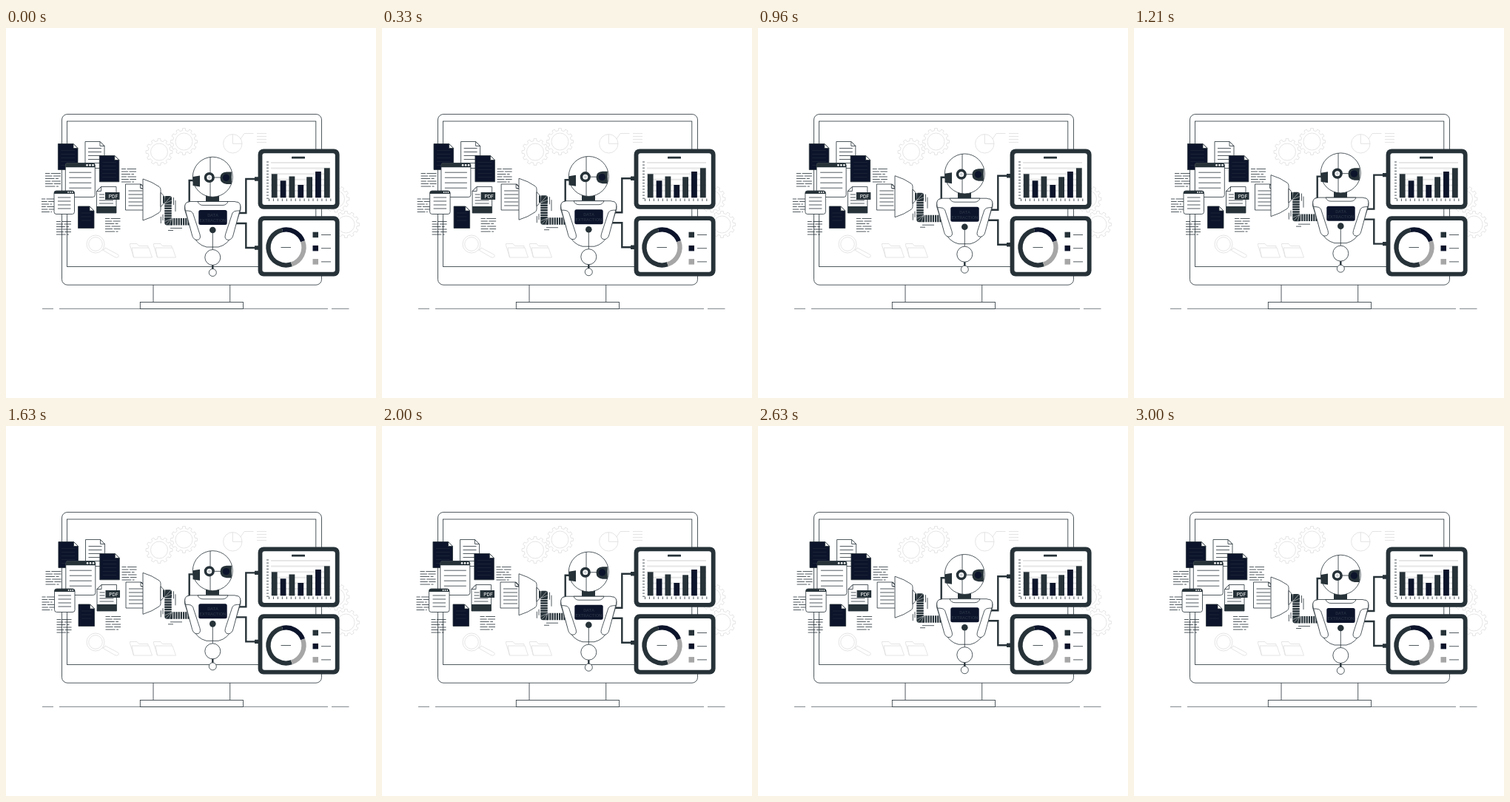
These frames come from a looping animation (500x500 px, 3040 ms). An HTML page:

```html
<!DOCTYPE html>
<html lang="en">
<head>
<meta charset="utf-8">
<title>Data extraction</title>
<style>
html, body { margin: 0; width: 100%; height: 100%; overflow: hidden; background: #fff; }
svg { display: block; width: 100vw; height: 100vh; }
text { font-family: Roboto, Arial, sans-serif; text-anchor: middle; }
.line { fill: none; stroke: #263238; stroke-width: .8; }
.paper { fill: #fff; stroke: #263238; stroke-width: .8; }
.faint { fill: none; stroke: #dedede; stroke-width: .8; }
.dark { fill: #263238; }
.navy { fill: #0c142b; }
.gray { fill: #a6a6a6; }
.pipe { fill: none; stroke: #263238; stroke-width: 2.4; }
</style>
</head>
<body>
<svg viewBox="0 0 500 500">
  <g id="backdrop">
    <path class="line" style="stroke-width:.6" d="M49 379.4H64M72 379.4H435M440 379.4H463.5"/>
    <g id="gears" class="faint"></g>
    <rect class="line" x="75.5" y="116.5" width="351" height="230.7" rx="7.5"/>
    <rect class="line" x="82.5" y="126" width="336.3" height="196.5"/>
    <path class="line" d="M199 347.2V370.5M302.7 347.2V370.5"/>
    <rect class="paper" x="181.3" y="370.5" width="139.2" height="9"/>
    <g class="faint">
      <circle cx="306.3" cy="156.3" r="12.7"/>
      <path d="M306.3 143.6V156.3H319M317 150L322 142.5H334.5M339 142.5H352M339 146.5H352M339 150.5H352M339 154.5H352"/>
      <circle cx="121" cy="292" r="12"/><circle cx="121" cy="292" r="9.3"/>
      <path d="M129.5 300.5L132.500 299M131.500 300.500L134 297L151 306Q153.5 308 151.5 309.5Q150 311 147 309.5Z"/>
      <path id="folder" d="M172.5 310L167.5 293.5V291.5H177L179.5 294.5H192V297M172.5 310L170 297H193L197.5 310Z"/>
      <use href="#folder" x="32"/>
    </g>
  </g>
  <g id="docs"></g>
  <g id="robot">
    <path class="pipe" d="M312 250H324.3V204H340M308 264H324.3V297H340M262 206H247.7V239"/>
    <path class="dark" d="M336 201.3H342V206.7H336ZM336 294.3H342V299.7H336Z"/>
    <path class="paper" d="M185 204Q198 208 207 214.500Q209 216 209 218.500V245.500Q209 248 207 249.500Q198 256 185 260Z"/>
    <path class="paper" d="M209 222.5Q214 226 214 232Q214 238 209 241.5Z"/>
    <g id="hose"></g>
    <path class="line" d="M226.5 229V239M229 233V248M209.3 255V264M212 252V260M222 270.5H238M219 273.5H226"/>

    <rect class="dark" x="270" y="226" width="18" height="11"/>
    <path class="paper" d="M249 234.500H309Q318 235.500 317 245.500L306 279Q300 293 287 296H271Q258 293 252 279L241.5 245.500Q240.5 235.500 249 234.500Z"/>
    <path class="paper" id="arm" d="M246 235Q240.5 236.500 242 244.500L251.5 280Q253 286 258 286.5Q264 286 262 279L252.5 250Q250.5 247 246 247L242.5 247"/>
    <use href="#arm" transform="translate(558.5) scale(-1 1)"/>
    <path class="paper" d="M259 234.5H300Q298 239.5 293 239.5H266Q261 239.5 259 234.5Z"/>
    <rect class="navy" x="260.3" y="246" width="38.4" height="20" rx="2.5"/>
    <g fill="#303c4c" font-size="6">
      <text x="279.5" y="255">DATA</text>
      <text x="279.5" y="262">EXTRACTION</text>
    </g>
    <path class="line" d="M279.3 276V300"/>
    <circle class="dark" cx="279.3" cy="273" r="4.3"/>
    <path class="pipe" d="M279.3 319V326"/>
    <circle class="paper" cx="279.3" cy="310" r="10.5"/>
    <circle class="paper" cx="279.3" cy="330.5" r="5"/>

    <circle class="paper" cx="279.3" cy="201.3" r="27"/>
    <path class="line" d="M276 174.5V228.3M281 202H290"/>
    <path class="dark" d="M252.5 201L262 199.5V214.5L252.5 213ZM304.8 194.5V211H298Q289.5 210 289.5 202.5Q289.5 195 298 194.5Z"/>
    <circle class="navy" cx="297.5" cy="202.3" r="4.7"/>
    <circle cx="274.8" cy="202" r="5.3" fill="#fff" stroke="#263238" stroke-width="3.6"/>
    <circle cx="274.8" cy="202" r="2" fill="#cfd3d6"/>
  </g>
  <g id="panels"></g>
</svg>
<script>
const LOOP = 3040;
const $ = id => document.getElementById(id);
const NS = "http://www.w3.org/2000/svg";

function add(parent, tag, attrs, text) {
  const node = document.createElementNS(NS, tag);
  for (const key in attrs) node.setAttribute(key, attrs[key]);
  if (text) node.textContent = text;
  parent.appendChild(node);
  return node;
}
const box = (parent, cls, x, y, width, height, rx = 0) =>
  add(parent, "rect", { class: cls, x, y, width, height, rx });
const path = (parent, cls, d, extra) => add(parent, "path", { class: cls, d, ...extra });

function rules(x, y, width, count, step) {
  let d = "";
  for (let i = 0; i < count; i++) d += `M${x} ${y + i * step}h${width}`;
  return d;
}

function gear(cx, cy, inner) {
  const teeth = 12, points = [];
  for (let i = 0; i < teeth; i++) {
    [[-.27, 15], [-.2, 18], [.2, 18], [.27, 15]].forEach(([shift, r]) => {
      const a = (i + shift) / teeth * 2 * Math.PI;
      points.push(`${(cx + r * Math.cos(a)).toFixed(2)} ${(cy + r * Math.sin(a)).toFixed(2)}`);
    });
  }
  add($("gears"), "path", { d: `M${points.join("L")}Z` });
  add($("gears"), "circle", { cx, cy, r: inner });
}

function sheet(x, y, w, h, navy) {
  const g = $("docs"), fold = 6;
  path(g, navy ? "navy" : "paper", `M${x} ${y}h${w - fold}l${fold} ${fold}v${h - fold}h${-w}Z`,
    { stroke: "#263238", "stroke-width": .8 });
  path(g, "paper", `M${x + w - fold} ${y}v${fold}h${fold}Z`);
  const count = Math.floor((h - 10) / 5);
  path(g, "line", rules(x + 4, y + 9, w - 8, count, 5), navy ? { style: "stroke:#1d2838" } : {});
}

function scribble(x, y, w) {
  let d = "";
  for (let i = 0; i < 6; i++) {
    const gap = w * (.3 + .4 * ((i * .37) % 1)), end = i % 3 === 2 ? w - 3 : w;
    d += `M${x} ${y + i * 3.5}h${gap}M${x + gap + 1.5} ${y + i * 3.5}H${x + end}`;
  }
  path($("docs"), "line", d);
}

function browser(x, y, w, h, header, lines, step) {
  const g = $("docs");
  box(g, "paper", x, y, w, h, 3);
  path(g, "dark", `M${x} ${y + header}v${3 - header}q0 -3 3 -3h${w - 6}q3 0 3 3v${header - 3}Z`);
  for (let i = 0; i < 3; i++)
    add(g, "circle", { cx: x + w - 2.8 - i * header * .7, cy: y + header / 2, r: header * .23, fill: "#fff" });
  path(g, "line", rules(x + 5, y + header + step, w - 10, lines, step));
}

function buildDocs() {
  const g = $("docs");
  scribble(53, 196.5, 21);
  scribble(156, 190.5, 20);
  scribble(48, 231, 17);
  scribble(68, 261.5, 20);
  scribble(134, 257.5, 20.5);
  sheet(70.4, 156.5, 26.6, 35, true);
  sheet(107, 153.5, 26, 36, false);
  browser(80.3, 182.5, 40, 46, 5.7, 4, 7);
  sheet(126.3, 172.5, 26.5, 35.3, true);
  browser(65, 220, 27.5, 31.5, 4, 4, 5);
  sheet(97.5, 241, 21.5, 29.5, true);

  path(g, "paper", "M128.5 214.5H149V250H122.5V220.5Z");
  path(g, "paper", "M128.5 214.5V220.5H122.5Z");
  path(g, "line", rules(126, 225, 7, 2, 4) + rules(126, 233, 19, 2, 4));
  box(g, "dark", 122.5, 241, 26.5, 9);
  box(g, "dark", 134, 222, 19.5, 10);
  add(g, "text", { x: 145, y: 229.6, fill: "#fff", "font-size": 6.7 }, "PDF");

  sheet(161.5, 211, 27, 35, false);
  path(g, "paper", "M181.5 211V216.5H187Z");
}

function buildHose() {
  const g = $("hose"), style = { "stroke-width": 9.5, fill: "none", stroke: "#263238" };
  const ribs = "2.5 .8";
  path(g, "", "M212 232H216", { ...style, "stroke-dasharray": ribs });
  path(g, "", "M219 236V258", { ...style, "stroke-dasharray": ribs });
  path(g, "", "M223 261.7H248", { ...style, "stroke-dasharray": "2.2 1" });
  path(g, "dark", "M215.5 227H221Q224 227 224 230V236.5H214.3ZM214.3 257.5H224V266.5H217.5Q214.3 266.5 214.3 263Z");
  path(g, "", "M214.5 237L222.5 228M214.5 237L224 233M224 257.5L216 265.5M224 257.5L221 266.5M224 257.5L214.5 261.5",
    { stroke: "#fff", "stroke-width": .5 });
}

function buildPanels() {
  const g = $("panels");
  [163.4, 254.2].forEach(y => {
    box(g, "dark", 340.6, y, 110, 81.3, 7.5);
    add(g, "rect", { x: 346.4, y: y + 5.8, width: 98.4, height: 69.7, rx: 3, fill: "#fff" });
  });

  box(g, "dark", 386, 173.7, 18, 2.8, .5);
  path(g, "", rules(358, 182, 80, 7, 7.6), { stroke: "#e6e6e6", "stroke-width": 2 });
  path(g, "line", rules(352, 181, 3, 13, 4.1));
  let ticks = "";
  for (let i = 0; i < 15; i++) ticks += `M${355.5 + i * 5.95} 230.6v3.4`;
  path(g, "line", ticks);
  [197.3, 206.3, 200.5, 212, 201.3, 194, 189.3].forEach((top, i) =>
    box(g, i % 2 ? "navy" : "dark", 358.8 + i * 11.85, top, 7.8, 229.3 - top));

  const cx = 378.5, cy = 296.5, r = 24;
  const at = deg => {
    const a = deg * Math.PI / 180;
    return `${cx + r * Math.cos(a)} ${cy + r * Math.sin(a)}`;
  };
  [[72, 258, "#263238"], [258, 340, "#0c142b"], [340, 432, "#a6a6a6"]].forEach(([from, to, stroke]) =>
    path(g, "", `M${at(from)}A${r} ${r} 0 ${to - from > 180 ? 1 : 0} 1 ${at(to)}`,
      { fill: "none", stroke, "stroke-width": 6.3 }));
  path(g, "line", "M371.5 296.5H385");
  ["dark", "navy", "gray"].forEach((cls, i) => {
    const y = 275.7 + i * 18.2;
    box(g, cls, 414.5, y, 7.5, 7.5);
    path(g, "line", `M426 ${y + 3.8}H439`);
  });
}

// CSS-style cubic Bezier easing, solved by bisection
function bezier(x1, y1, x2, y2) {
  const curve = (a, b, u) => 3 * a * u * (1 - u) ** 2 + 3 * b * u * u * (1 - u) + u ** 3;
  return x => {
    let lo = 0, hi = 1;
    for (let i = 0; i < 24; i++) {
      const mid = (lo + hi) / 2;
      if (curve(x1, x2, mid) < x) lo = mid; else hi = mid;
    }
    return curve(y1, y2, lo);
  };
}
const ease = bezier(.25, .1, .25, 1);

// Sideways shake: one stop every tenth of the loop
const SHAKE = [0, -.5, 1, -2, 2, -2, 2, -2, 1, -.5, 0];
const FLOAT_HEIGHT = 5.8, FLOAT_LEAD = 40;

function draw(ms) {
  const p = ms % LOOP / LOOP;
  const i = Math.floor(p * 10);
  const dx = SHAKE[i] + (SHAKE[i + 1] - SHAKE[i]) * ease(p * 10 - i);
  const lift = (1 - Math.cos((ms + FLOAT_LEAD) / LOOP * 2 * Math.PI)) / 2;
  $("docs").setAttribute("transform", `translate(${dx.toFixed(3)} 0)`);
  $("robot").setAttribute("transform", `translate(0 ${(-FLOAT_HEIGHT * lift).toFixed(3)})`);
}

gear(207, 167.5, 11.5);
gear(240.5, 153.5, 11.5);
gear(446, 231, 11.5);
gear(459.5, 265.5, 11.5);
buildDocs();
buildHose();
buildPanels();

const start = performance.now();
function tick() {
  draw(performance.now() - start);
  requestAnimationFrame(tick);
}
draw(0);
requestAnimationFrame(tick);
</script>
</body>
</html>
```
